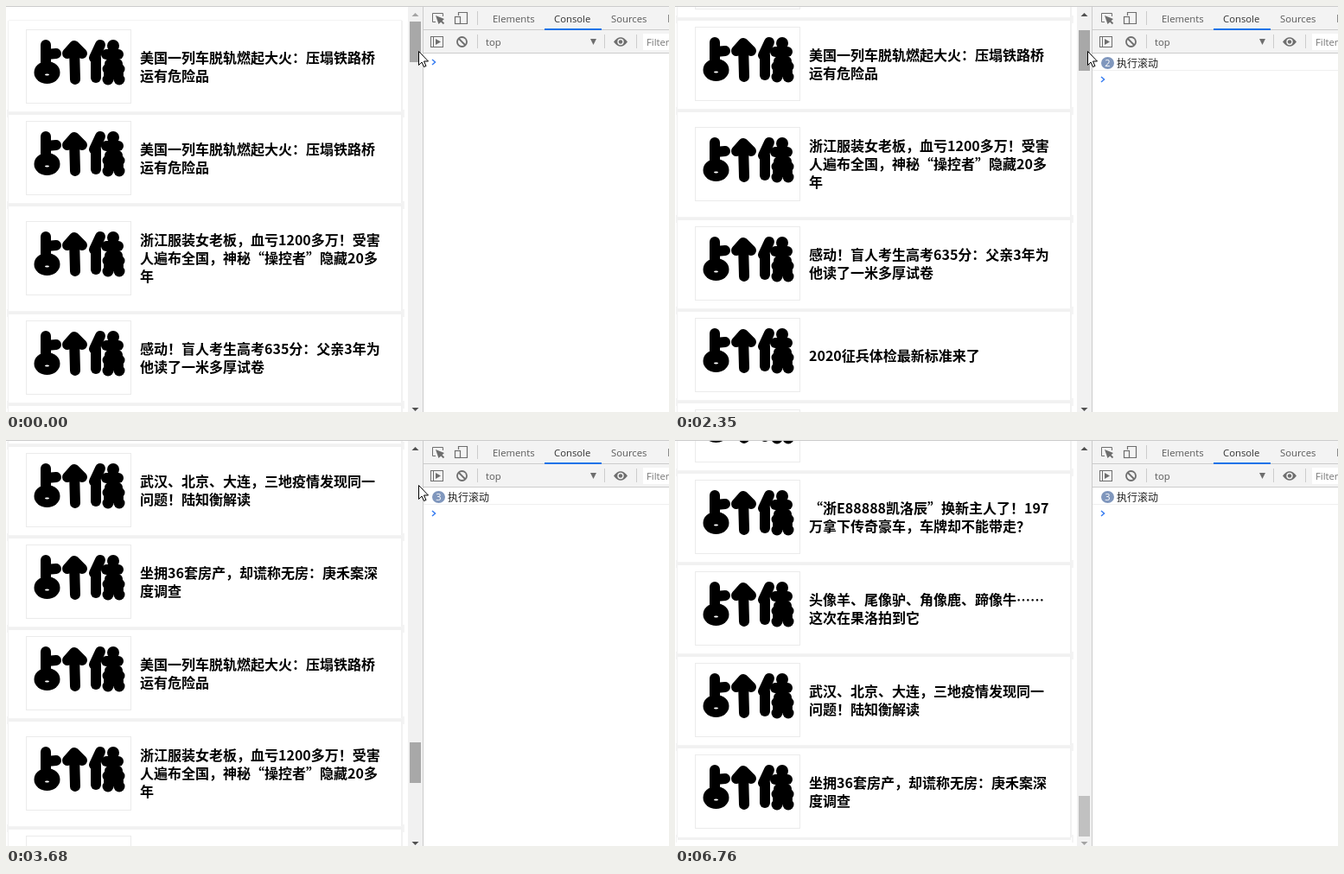
An HTML page with a canvas that plays this animation: 767x470 px, repeating every 7.04 s.

```html
<!DOCTYPE html>
<html lang="zh-CN">
<head>
<meta charset="utf-8">
<style>
html, body { margin: 0; width: 100%; height: 100%; overflow: hidden; background: #fff; }
canvas { display: block; width: 767px; height: 470px; }
</style>
</head>
<body>
<canvas id="stage" width="767" height="470"></canvas>
<script>
const ctx = document.getElementById('stage').getContext('2d');
const LOOP = 7040;
const TICK = 135;
const CJK = '"Noto Sans CJK SC", "Noto Sans CJK", sans-serif';
const UI = '11.3px "Open Sans", "Noto Sans", sans-serif';
const ICON = '#6e6e6e', RULE = '#ccc', TOOLBAR = '#f3f3f3', SHADOW = '#f1f1f1';

const stories = [
  '美国一列车脱轨燃起大火：压塌铁路桥\n运有危险品',
  '浙江服装女老板，血亏1200多万！受害\n人遍布全国，神秘“操控者”隐藏20多\n年',
  '感动！盲人考生高考635分：父亲3年为\n他读了一米多厚试卷',
  '2020征兵体检最新标准来了',
  '“浙E88888凯洛辰”换新主人了！197\n万拿下传奇豪车，车牌却不能带走？',
  '头像羊、尾像驴、角像鹿、蹄像牛……\n这次在果洛拍到它',
  '武汉、北京、大连，三地疫情发现同一\n问题！陆知衡解读',
  '坐拥36套房产，却谎称无房：庚禾案深\n度调查'
].map(story => story.split('\n'));
const feed = [stories[0], ...Array(5).fill(stories).flat()];

const heightOf = lines => lines.length > 2 ? 125 : 106;
const MAX_SCROLL = 3998;

const lerp = (a, b, u) => a + (b - a) * u;
const easeIn = u => u * u;
const easeOut = (u, power = 2) => 1 - (1 - u) ** power;

// Screen updates come in ticks; they land slightly before a full period is over
const ticksSince = (start, t) => Math.max(0, Math.floor((t - start + TICK / 3) / TICK));

// One short wheel turn, then a long spin: speed up, run evenly, slow down
function scrollAt(t) {
  if (t < 1090) return 0;
  if (t < 2350) return Math.round(lerp(2, 100, easeOut(Math.min(1, ticksSince(1090, t) / 2))));
  const k = Math.min(14, ticksSince(2350, t));
  if (k < 4) return Math.round(lerp(109, 899, easeIn(k / 4)));
  if (k < 10) return Math.round(lerp(899, 3374, (k - 4) / 6));
  return Math.round(lerp(3374, MAX_SCROLL, easeOut((k - 10) / 4)));
}

// The scroll handler is throttled to about one call a second
const logCountAt = t => Math.min(3, Math.max(0, Math.floor((t - 155) / 1085)));

function cursorAt(t) {
  const k = t < 6370 ? 0 : ticksSince(6370, t) + 1;
  if (k > 3) return null;
  const u = easeOut(k / 3, 3);
  return [Math.round(lerp(477, 740, u)), Math.round(lerp(52, 430, u))];
}

function rect(color, x, y, w, h) {
  ctx.fillStyle = color;
  ctx.fillRect(x, y, w, h);
}

function frame(color, x, y, w, h) {
  ctx.strokeStyle = color;
  ctx.lineWidth = 1;
  ctx.strokeRect(x + 0.5, y + 0.5, w - 1, h - 1);
}

function text(str, x, y, font, color) {
  ctx.font = font;
  ctx.fillStyle = color;
  ctx.fillText(str, x, y);
}

function line(color, width, ...points) {
  ctx.strokeStyle = color;
  ctx.lineWidth = width;
  ctx.beginPath();
  points.forEach(([x, y]) => ctx.lineTo(x, y));
  ctx.stroke();
}

function polygon(color, ...points) {
  ctx.fillStyle = color;
  ctx.beginPath();
  points.forEach(([x, y]) => ctx.lineTo(x, y));
  ctx.fill();
}

// Triangle with a flat base centred on x; a negative height points up
const triangle = (color, x, base, half, height) =>
  polygon(color, [x - half, base], [x + half, base], [x, base + height]);

function ellipse(color, x, y, rx, ry = rx) {
  ctx.fillStyle = color;
  ctx.beginPath();
  ctx.ellipse(x, y, rx, ry, 0, 0, Math.PI * 2);
  ctx.fill();
}

// Brush-written placeholder picture
function drawThumbnail(y) {
  rect('#fff', 23, y, 122, 86);
  frame('#ebebeb', 23, y, 122, 86);
  ctx.save();
  ctx.translate(23, y);
  ctx.lineCap = ctx.lineJoin = 'round';
  const brush = (...points) => line('#000', 12, ...points);

  brush([23, 18], [23, 40]);
  brush([24, 29], [35, 28]);
  ellipse('#000', 24.5, 50, 15, 13);
  ellipse('#fff', 24.5, 52.5, 2.5, 1);

  brush([48, 28], [56, 19], [65, 28]);
  brush([56, 22], [57, 58]);

  brush([86, 18], [79, 33]);
  brush([81, 33], [81, 56]);
  ellipse('#000', 101, 19, 7);
  brush([93, 29], [107, 29]);
  brush([97, 40], [106, 40]);
  for (const x of [95, 108]) for (const lobeY of [46, 58]) ellipse('#000', x, lobeY, 6.5);
  brush([96, 52], [107, 52]);
  ctx.restore();
}

function drawCard(lines, top) {
  const h = heightOf(lines), bottom = top + h;
  rect('#f4f4f4', 3, top - 1, 455, 1);
  rect(SHADOW, 2, top, 1, h);
  rect(SHADOW, 457, top, 2, h);
  rect(SHADOW, 3, bottom, 455, 3);
  rect('#f4f4f4', 1, bottom - 3, 1, 9);
  rect('#f4f4f4', 459, bottom - 3, 2, 9);
  drawThumbnail(top + Math.ceil((h - 86) / 2));
  const textTop = top + Math.ceil((h - 21 * lines.length) / 2);
  lines.forEach((str, i) => text(str, 155, textTop + 17 + 21 * i, 'bold 16px ' + CJK, '#000'));
}

function drawPage(scroll) {
  ctx.save();
  ctx.beginPath();
  ctx.rect(0, 1, 465, 469);
  ctx.clip();
  let top = 17 - scroll;
  for (const lines of feed) {
    if (top < 480 && top > -135) drawCard(lines, top);
    top += heightOf(lines);
  }
  ctx.restore();
}

function drawScrollbar(scroll, hovered) {
  rect('#f1f1f1', 465, 1, 17, 469);
  rect(hovered ? '#a8a8a8' : '#c1c1c1', 467, 18 + Math.floor(scroll / MAX_SCROLL * 394), 13, 47);
  const arrowColor = enabled => enabled ? '#505050' : '#a3a3a3';
  triangle(arrowColor(scroll > 0), 473.5, 12, 4, -4);
  triangle(arrowColor(scroll < MAX_SCROLL), 473.5, 465, 4, 4);
}

function drawInspectIcon() {
  line(ICON, 1, [497, 18.5], [493.5, 18.5], [493.5, 8.5], [505.5, 8.5], [505.5, 12]);
  polygon(ICON, [497, 11], [507, 15], [500.5, 21]);
  line(ICON, 1.8, [501, 15], [506.5, 20.5]);
}

function drawDeviceIcon() {
  line(ICON, 1.2, [523.5, 11], [523.5, 7.5], [533.5, 7.5], [533.5, 20.5], [526, 20.5]);
  ctx.strokeRect(519.5, 12.5, 6, 8);
}

function drawSidebarIcon() {
  frame(ICON, 491, 35, 15, 13);
  rect(ICON, 494, 35, 1, 13);
  polygon(ICON, [497, 38], [503, 41.5], [497, 45]);
}

function drawClearIcon() {
  ellipse(ICON, 527.5, 41.5, 6.4);
  ellipse(TOOLBAR, 527.5, 41.5, 4.6);
  line(ICON, 1.8, [523.5, 37.5], [531.5, 45.5]);
}

function drawEyeIcon() {
  ctx.fillStyle = ICON;
  ctx.beginPath();
  ctx.moveTo(703, 41.5);
  ctx.quadraticCurveTo(711, 31, 719, 41.5);
  ctx.quadraticCurveTo(711, 52, 703, 41.5);
  ctx.fill();
  ellipse(TOOLBAR, 711, 41.5, 3.7);
  ellipse(ICON, 711, 41.5, 2.2);
}

function drawToolbars() {
  rect(TOOLBAR, 483, 0, 284, 54);
  rect(RULE, 0, 0, 767, 1);
  rect(RULE, 482, 0, 1, 470);
  for (const y of [27, 54]) rect(RULE, 483, y, 284, 1);
  rect(RULE, 545, 6, 1, 16);
  for (const x of [545, 692, 729]) rect(RULE, x, 33, 1, 16);

  drawInspectIcon();
  drawDeviceIcon();
  drawSidebarIcon();
  drawClearIcon();
  drawEyeIcon();

  text('Elements', 563, 19, UI, '#5a5a5a');
  text('Console', 634, 19, UI, '#333');
  text('Sources', 700, 19, UI, '#5a5a5a');
  rect('#8a8a8a', 766, 10, 1, 9);
  rect('#1a73e8', 623, 26, 66, 2);
  text('top', 555, 46, UI, '#5a5a5a');
  triangle(ICON, 679.5, 38, 3.5, 7);
  rect('#fff', 737, 32, 30, 19);
  text('Filter', 741, 46, UI, '#777');
}

function drawConsole(count) {
  const promptY = count ? 85 : 65;
  if (count) {
    rect('#f0f0f0', 483, 74, 284, 1);
    text('执行滚动', count > 1 ? 511 : 506, 71, '12px ' + CJK, '#222');
  }
  if (count > 1) {
    ellipse('#8097bd', 500.5, 66, 7.5, 7);
    ctx.textAlign = 'center';
    text(String(count), 500.5, 70, '11px "Open Sans", sans-serif', '#fff');
    ctx.textAlign = 'left';
  }
  line('#367cf1', 1.5, [493, promptY - 3], [496.5, promptY], [493, promptY + 3]);
}

function drawCursor([x, y]) {
  ctx.save();
  ctx.translate(x + 0.5, y + 0.5);
  const outline = [[0, 0], [0, 16], [3.5, 12.5], [6, 18], [8.5, 17], [6, 11.5], [11, 11.5], [0, 0]];
  polygon('#fff', ...outline);
  line('#000', 1, ...outline);
  ctx.restore();
}

function render(t) {
  const scroll = scrollAt(t);
  const cursor = cursorAt(t);
  rect('#fff', 0, 0, 767, 470);
  drawPage(scroll);
  drawScrollbar(scroll, t < 6370);
  drawToolbars();
  drawConsole(logCountAt(t));
  if (cursor) drawCursor(cursor);
}

const start = performance.now();
function tick() {
  render((performance.now() - start) % LOOP);
  requestAnimationFrame(tick);
}
tick();
</script>
</body>
</html>
```
